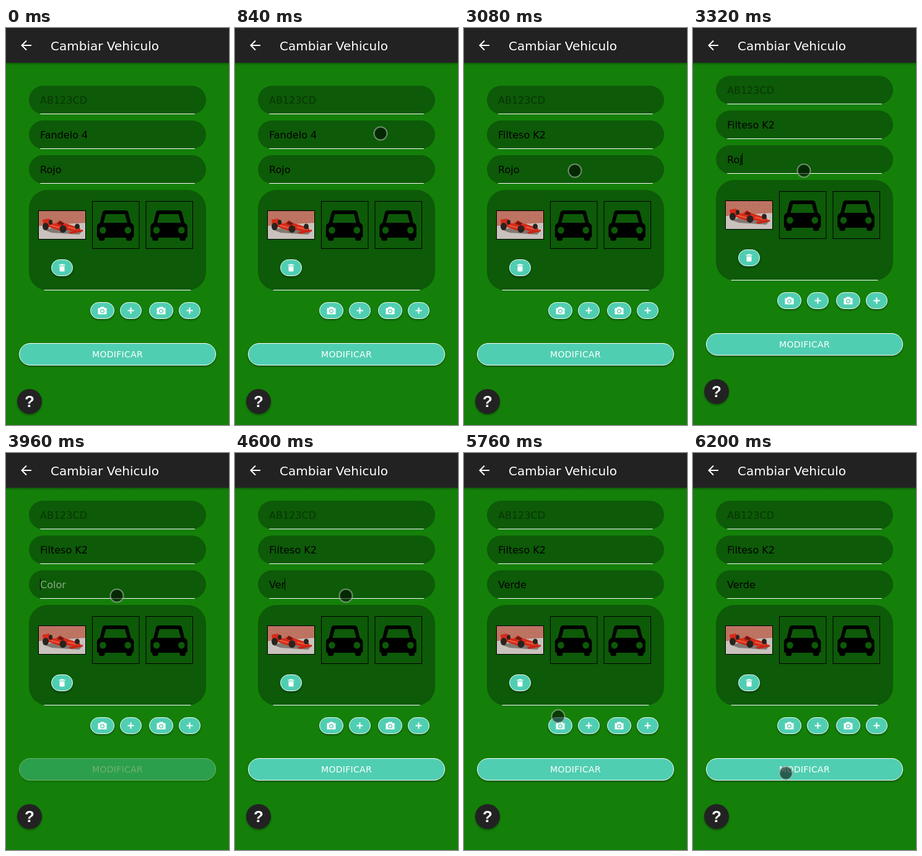
An HTML page that plays this animation: 360x640 px, repeating every 6.28 s.

```html
<!DOCTYPE html>
<html lang="es">
<head>
<meta charset="utf-8">
<style>
  html, body { margin: 0; height: 100%; overflow: hidden; background: #148009; }
  svg { display: block; width: 100vw; height: 100vh; font: 16px "DejaVu Sans", sans-serif; }
  text { white-space: pre; }
  .pill { fill: #50ceb2; stroke: #fff; }
  .raised { filter: drop-shadow(0 2px 1.5px rgba(0, 0, 0, .35)); }
</style>
</head>
<body>
<svg viewBox="0 0 360 640">
  <defs>
    <path id="car" fill-rule="evenodd" d="M18 15H57Q61 15 62 19L66 35Q71 37 71 42V56Q71 59 68 59V61Q68 64 65 64H61Q58 64 58 61V59H22V61Q22 64 19 64H15Q12 64 12 61V59Q9 59 9 56V42Q9 37 14 35L18 19Q19 15 23 15Z
      M24 21L20 35H60L56 21ZM19 41.500a5.500 5.500 0 1 0 .01 0ZM61 41.500a5.500 5.500 0 1 0 .01 0Z"/>
    <path id="camera" fill="#fff" fill-rule="evenodd" d="M-7-4H-4L-2.500-6H2.500L4-4H7V6H-7ZM0-2.700a3.600 3.600 0 1 0 .01 0ZM0-1.200a2.200 2.200 0 1 1-.01 0Z"/>
    <path id="plus" fill="none" stroke="#fff" stroke-width="2" d="M-5 0H5M0-5V5"/>
    <path id="trash" fill="#fff" d="M-5-5H-2.500L-1.500-6H1.500L2.500-5H5V-3.500H-5ZM-4-2.500H4V5Q4 6 3 6H-3Q-4 6-4 5Z"/>
    <pattern id="bricks" width="8" height="5" patternUnits="userSpaceOnUse">
      <rect width="8" height="5" fill="#b76a58"/>
      <path d="M0 .5H8M0 3H8M2 .5V3M6 3V5" stroke="#cc8a78" stroke-width=".6"/>
    </pattern>
    <linearGradient id="shade" x2="0" y2="1">
      <stop stop-opacity=".3"/><stop offset="1" stop-opacity="0"/>
    </linearGradient>
  </defs>
  <rect width="360" height="640" fill="#148009"/>
  <g id="page">
    <g id="panels"></g>
    <text x="55" y="122" opacity=".4">AB123CD</text>
    <text id="model" x="55" y="178"></text>
    <text id="color" x="55" y="234"></text>
    <rect id="caret" width="1" height="19"/>

    <g transform="translate(52 294)">
      <rect x=".5" y=".5" width="76" height="46" fill="url(#bricks)"/>
      <path d="M1 25L76 20V46H1Z" fill="#c9c2bd"/>
      <path d="M8 31L22 36L66 39L70 35L30 27Z" fill="#827973"/>
      <path d="M7 15L18 13V20L28 21L35 16L41 20L57 25L68 29V33L60 35L48 32L35 33L18 27L8 23Z" fill="#d72a18"/>
      <path d="M35 17L42 21L39 24L31 22Z" fill="#6b1711"/>
      <path d="M20 24L35 28M48 27L65 31" stroke="#f0684d" stroke-width="1.500"/>
      <g fill="#28231f">
        <ellipse cx="12" cy="26" rx="5" ry="6"/><ellipse cx="20" cy="19" rx="3" ry="4"/>
        <ellipse cx="40" cy="30" rx="5.500" ry="6"/><ellipse cx="63" cy="26" rx="4" ry="4.500"/>
      </g>
      <path d="M49 35L72 31V34L53 38Z" fill="#c62415"/>
      <rect x=".5" y=".5" width="76" height="46" fill="none" stroke="#000"/>
    </g>
    <g id="slots"></g>
    <g id="buttons"></g>
    <g id="submit">
      <rect class="pill raised" x="21.500" y="508.500" width="317" height="35" rx="17.500"/>
      <text x="180" y="531" text-anchor="middle" font-size="14" letter-spacing=".3" fill="#fff">MODIFICAR</text>
    </g>
    <circle class="raised" cx="38" cy="602" r="20" fill="#222"/>
    <text x="38" y="611" text-anchor="middle" fill="#fff" style="font:bold 26px 'Liberation Sans',sans-serif">?</text>
  </g>
  <rect y="56" width="360" height="4" fill="url(#shade)"/>
  <rect width="360" height="56" fill="#222"/>
  <path d="M41 28H26M33 20.500L25.500 28L33 35.500" fill="none" stroke="#fff" stroke-width="2"/>
  <text x="72" y="36" font-size="20" fill="#fff">Cambiar Vehiculo</text>
  <circle id="pointer" r="10.500" fill="rgba(0,0,0,.55)" stroke="rgba(170,190,170,.6)" stroke-width="2"/>
</svg>
<script>
const $ = id => document.getElementById(id);
const LOOP = 6280, BLINK = 205;
const OLD_MODEL = "Fandelo 4", NEW_MODEL = "Filteso K2";
const OLD_COLOR = "Rojo", NEW_COLOR = "Verde";

const panel = (y, h, r) => {
  const dx = Math.sqrt(r * r - (r - .5) ** 2);
  return `<rect x="37" y="${y}" width="286" height="${h}" rx="${r}" fill="#0d5a08"/>
    <rect x="${37 + r - dx}" y="${y + h - 1}" width="${286 - 2 * (r - dx)}" height="1" fill="#fff"/>`;
};
$("panels").innerHTML = [93, 149, 205].map(y => panel(y, 46, 23)).join("") + panel(261, 162, 30);

$("slots").innerHTML = [139, 225.5].map(x => `<g transform="translate(${x} 279)">
  <rect x=".5" y=".5" width="75.500" height="76" fill="none" stroke="#000"/>
  <use href="#car" transform="translate(-.8 0) scale(.96 1)"/></g>`).join("");

const button = (x, y, w, icon) => `<g transform="translate(${x} ${y})">
  <rect class="pill raised" x=".5" y=".5" width="${w - 1}" height="26" rx="13"/>
  <use href="#${icon}" x="${w / 2}" y="13.500"/></g>`;
$("buttons").innerHTML = button(73, 373, 35, "trash") +
  [136, 231].map(x => button(x, 442, 39, "camera") + button(x + 48, 442, 35, "plus")).join("");

// Pointer stops: time, x, y
const stops = [
  [0, 376, 240], [660, 235, 170], [840, 235, 170], [1240, 232, 168], [2580, 232, 168],
  [3040, 179, 230], [5110, 179, 230], [5240, 189, 350], [5560, 152, 424],
  [5740, 152, 424], [6180, 150, 516], [LOOP, 150, 516]
];
function pointerAt(t) {
  const i = stops.findIndex(s => s[0] > t);
  const [t0, x0, y0] = stops[i - 1], [t1, x1, y1] = stops[i];
  const p = (t - t0) / (t1 - t0), k = p * p * (3 - 2 * p);
  return [x0 + (x1 - x0) * k, y0 + (y1 - y0) * k];
}

// Keys pressed in a run, and the time of the latest one
function run(t, start, step, total) {
  const n = Math.max(0, Math.min(total, Math.floor((t - start) / step) + 1));
  return { n, last: n ? start + (n - 1) * step : -1 };
}

function draw(t) {
  const erase1 = run(t, 1080, 85, 8), type1 = run(t, 1980, 63, 9);
  const erase2 = run(t, 3300, 70, 4), type2 = run(t, 4390, 80, 5);
  const model = type1.n ? NEW_MODEL.slice(0, 1 + type1.n) : OLD_MODEL.slice(0, 9 - erase1.n);
  const color = type2.n ? NEW_COLOR.slice(0, type2.n) : OLD_COLOR.slice(0, 4 - erase2.n);
  const scroll = t >= 3120 ? -16 : 0;

  $("model").textContent = model;
  $("color").textContent = color || "Color";
  $("color").setAttribute("fill", color ? "#000" : "#8ba886");
  $("submit").setAttribute("opacity", color ? 1 : .4);
  $("page").setAttribute("transform", `translate(0 ${scroll})`);

  const second = t >= 3120;
  const focused = second || (t >= 1000 && t < 2900);
  const last = second ? Math.max(3120, erase2.last, type2.last) : Math.max(1000, erase1.last, type1.last);
  const value = second ? color : model;
  const width = value ? $(second ? "color" : "model").getComputedTextLength() : 0;
  $("caret").setAttribute("x", 55 + Math.round(width) - (value ? 1 : 0));
  $("caret").setAttribute("y", second ? 218 : 162);
  $("caret").setAttribute("opacity", focused && Math.floor((t - last) / BLINK) % 2 === 0 ? 1 : 0);

  $("pointer").setAttribute("transform", `translate(${pointerAt(t)})`);
}

function frame() {
  draw(performance.now() % LOOP);
  requestAnimationFrame(frame);
}
frame();
</script>
</body>
</html>
```
